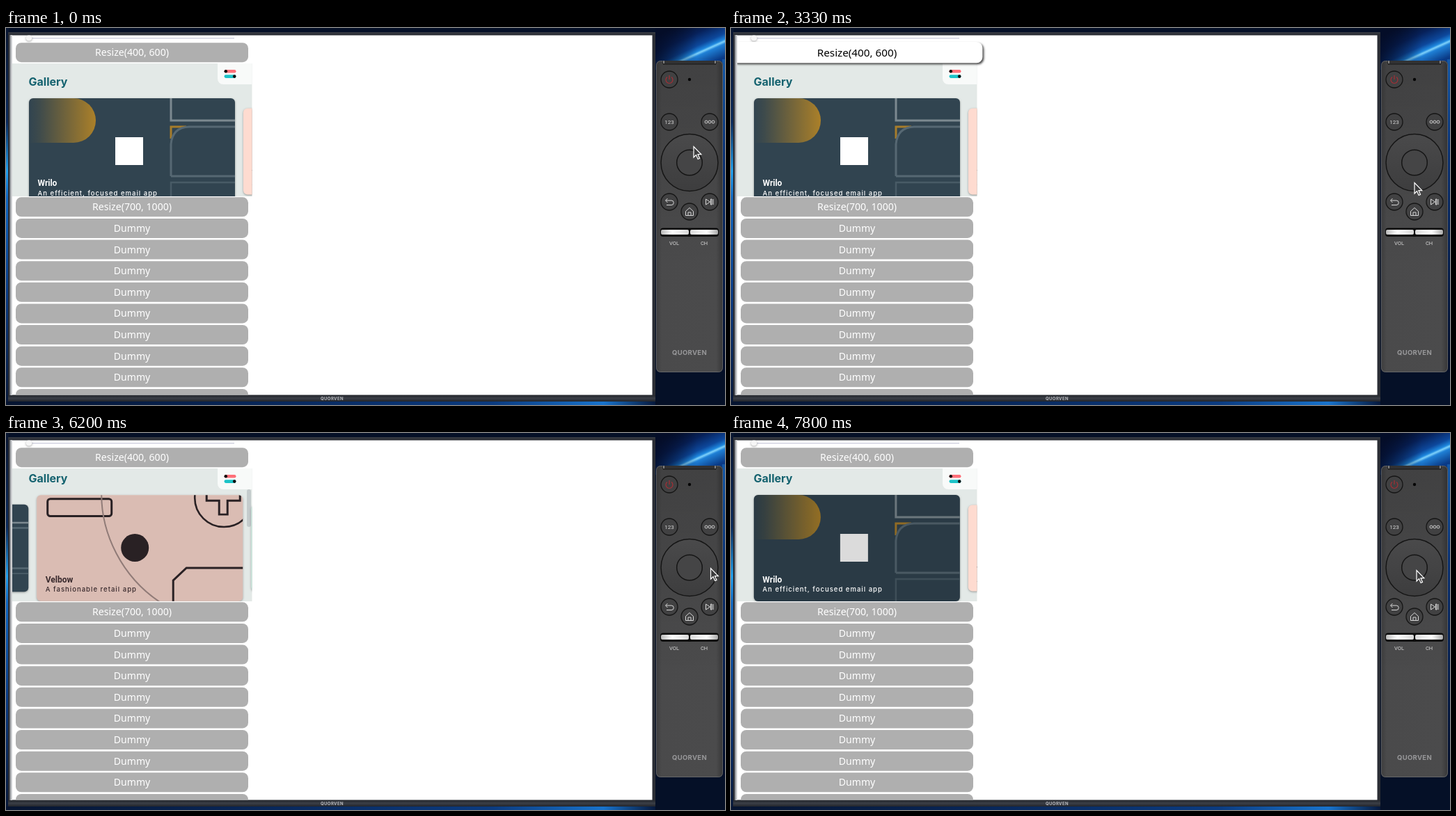
An HTML page with a canvas that plays this animation: 1033 by 542 pixels, repeating every 8 s.

```html
<!DOCTYPE html>
<html lang="en">
<head>
<meta charset="utf-8">
<title>TV remote focus demo</title>
<style>
html, body { margin: 0; width: 100%; height: 100%; overflow: hidden; background: #06122c; }
canvas { display: block; }
</style>
</head>
<body>
<canvas id="stage" width="1033" height="542"></canvas>
<script>
const ctx = document.getElementById('stage').getContext('2d');
const LOOP = 8000, TAU = Math.PI * 2;
const BRAND = 'QUORVEN';

const clamp01 = v => Math.min(1, Math.max(0, v));
const ramp = (t, from, to) => clamp01((t - from) / (to - from));
const ease = v => v * v * (3 - 2 * v);
const between = (t, from, to) => t >= from && t < to;

function gradient(x0, y0, x1, y1, stops) {
  const g = ctx.createLinearGradient(x0, y0, x1, y1);
  stops.forEach(([at, color]) => g.addColorStop(at, color));
  return g;
}
function rect(x, y, w, h, fill) {
  ctx.fillStyle = fill;
  ctx.fillRect(x, y, w, h);
}
function round(x, y, w, h, r, fill, stroke, width = 1) {
  ctx.beginPath();
  ctx.roundRect(x, y, w, h, r);
  paint(fill, stroke, width);
}
function circle(x, y, r, fill, stroke, width = 1) {
  ctx.beginPath();
  ctx.arc(x, y, r, 0, TAU);
  paint(fill, stroke, width);
}
function path(d, fill, stroke, width = 1) {
  const p = new Path2D(d);
  if (fill) { ctx.fillStyle = fill; ctx.fill(p); }
  if (stroke) { ctx.strokeStyle = stroke; ctx.lineWidth = width; ctx.stroke(p); }
}
function paint(fill, stroke, width) {
  if (fill) { ctx.fillStyle = fill; ctx.fill(); }
  if (stroke) { ctx.strokeStyle = stroke; ctx.lineWidth = width; ctx.stroke(); }
}
function text(str, x, y, font, color, align = 'left', spacing = 0) {
  ctx.font = font;
  ctx.letterSpacing = spacing + 'px';
  ctx.textAlign = align;
  ctx.fillStyle = color;
  ctx.fillText(str, x, y);
}
function shadow(color, blur = 0, dx = 0, dy = 0) {
  ctx.shadowColor = color;
  ctx.shadowBlur = blur;
  ctx.shadowOffsetX = dx;
  ctx.shadowOffsetY = dy;
}
const noShadow = () => shadow('transparent');
function group(draw) {
  ctx.save();
  draw();
  ctx.restore();
}

const SCREEN = [9, 10.5, 919.5, 517];

function drawDesktop() {
  rect(0, 0, 1033, 542, '#051027');
  rect(0, 0, 4, 542, gradient(0, 0, 0, 542, [[0, '#081530'], [.25, '#0a2a5c'], [.38, '#22a0ee'],
    [.45, '#1169c4'], [.7, '#0a3c86'], [1, '#071737']]));
  rect(0, 537, 933, 5, gradient(0, 0, 933, 0, [[0, '#061430'], [.4, '#08275a'], [.75, '#0b3b80'],
    [.92, '#1873cc'], [1, '#06183c']]));
  // Light beam rising to the right behind the remote
  rect(933, 0, 100, 60, gradient(972, -6, 1000, 56, [[0, '#040d28'], [.3, '#07215a'], [.55, '#0d489c'],
    [.66, '#1d86dd'], [.7, '#7fd2fb'], [.75, '#1f80d6'], [1, '#0a3a86']]));
  rect(933, 0, 60, 60, gradient(933, 0, 993, 0, [[0, 'rgba(4,13,40,.85)'], [1, 'rgba(4,13,40,0)']]));
  rect(1029, 45, 4, 450, gradient(0, 45, 0, 495, [[0, '#1458a6'], [.3, '#0a3274'], [1, '#030d28']]));
}

function drawTv() {
  rect(3, 6, 930, 531, '#2b2e35');
  rect(3.5, 6.5, 929, 1, '#43474f');
  rect(5, 10, 4, 518, gradient(5, 0, 9, 0, [[0, '#5a5d63'], [.6, '#c4c6c9'], [1, '#dcdddf']]));
  rect(3, 528, 930, 9, gradient(0, 528, 0, 537, [[0, '#25282e'], [.5, '#3a3e46'], [1, '#22252b']]));
  text(BRAND, 468.5, 534.5, 'bold 6px Inter, sans-serif', '#b9bbbf', 'center', .4);
  rect(...SCREEN, '#fff');
}

function drawSlider(t) {
  const focused = between(t, 470, 2730);
  const grown = ease(ramp(t, 670, 1130)) * (1 - ease(ramp(t, 2600, 2800)));
  rect(33, 14, 295, 1.4, '#cfd0de');
  shadow('rgba(0,0,0,.35)', 3, 0, 1);
  circle(33, 14.3, 4.3 + 3 * grown, '#f6f6f6');
  noShadow();
  if (focused) path('M21 8L12 15.5L21 24M341 8L350 15.5L341 24', null, '#111', 1.5);
}

function drawButton(label, centerY, focus = 0) {
  group(() => {
    ctx.translate(181, centerY);
    ctx.scale(1 + .08 * focus, 1 + .08 * focus);
    const shade = Math.round(175 + 80 * focus);
    if (focus) shadow(`rgba(0,0,0,${.7 * focus})`, 3, 2, 2);
    round(-167, -14, 334, 28, 8, `rgb(${shade},${shade},${shade})`);
    noShadow();
    const ink = Math.round(255 * (1 - focus));
    text(label, 0, 5, '14.1px "Noto Sans", sans-serif', `rgb(${ink},${ink},${ink})`, 'center');
  });
}

function drawMailArt() {
  path('M0 0H64A32 32 0 0 1 64 64H0Z', gradient(0, 0, 96, 0, [[0, 'rgba(170,128,40,0)'], [.15, 'rgba(170,128,40,.1)'], [1, '#ab8029']]));
  path('M204 0V32H296', null, '#7c8990', 3);
  path('M204 58V41H226', null, '#a77d2b', 3);
  path('M204 112V66Q206 42 230 41H296M204 112H296', null, '#566873', 3);
  path('M204 153V121H296', null, '#485b66', 2.5);
  round(124, 56, 40, 40, 0, '#fff');
}
function drawShopArt() {
  const ink = '#30262a';
  round(15.5, 5.5, 92, 25, 4, null, ink, 3);
  path('M93 -4C92 55 122 118 178 155', null, '#a78f8b', 2);
  circle(269, 4, 42, null, ink, 2.6);
  path('M244 -5V8H262V28H274V8H292V-5H274V-20H262V-5Z', null, ink, 3);
  path('M196 156V123L215 105H300', null, ink, 3);
  circle(141, 76, 20, ink);
}

const cards = [
  { title: 'Wrilo', note: 'An efficient, focused email app', fill: '#314450', ink: '#fff', art: drawMailArt },
  { title: 'Velbow', note: 'A fashionable retail app', fill: '#fedbd0', ink: '#38292c', art: drawShopArt },
  { title: '', note: '', fill: '#d1f2e6', ink: '#222', art() {} },
];
const CARD_W = 296, CARD_H = 153, PITCH = 308;

function drawCard(card, x, top, distance, tint) {
  const h = CARD_H - 29 * Math.min(1, distance) ** 1.3;
  const y = top + (CARD_H - h) / 2;
  shadow('rgba(0,0,0,.35)', 3, 0, 1);
  round(x, y, CARD_W, h, 6, card.fill);
  noShadow();
  group(() => {
    ctx.beginPath();
    ctx.roundRect(x, y, CARD_W, h, 6);
    ctx.clip();
    ctx.translate(x, y);
    group(() => {
      ctx.scale(1, h / CARD_H);
      card.art();
    });
    rect(0, 0, CARD_W, h, `rgba(0,0,0,${.14 * tint})`);
    text(card.title, 12.5, h - 27, 'bold 12px Roboto, sans-serif', card.ink);
    text(card.note, 12.5, h - 13.5, '500 9.5px Inter, sans-serif', card.ink, 'left', 1.02);
  });
}

// Focus makes the list jump just far enough, then it settles on a page.
const ENTER = 5600, NEXT = 6070, BACK = 6930;
function carouselScroll(t) {
  const rest = since => 24.6 * Math.exp(-6 * (t - since) / 1000);
  if (t < NEXT) return 0;
  return t < BACK ? PITCH - rest(NEXT) : rest(BACK);
}

function drawGallery(t) {
  group(() => {
    ctx.beginPath();
    ctx.rect(9, 51, 344.5, 191);
    ctx.clip();
    rect(9, 51, 345, 191, '#e3e9e7');
    const lift = t >= ENTER ? 12 : 0;
    const scroll = carouselScroll(t);
    text('Gallery', 32.5, 82.5 - lift, 'bold 16px Inter, sans-serif', '#14626f');
    const tints = [
      ramp(t, ENTER, ENTER + 130) - ramp(t, NEXT, NEXT + 130) + ramp(t, BACK, BACK + 130),
      ramp(t, NEXT, NEXT + 130) - ramp(t, BACK, BACK + 130),
      0,
    ];
    cards.forEach((card, i) => {
      const offset = i * PITCH - scroll;
      drawCard(card, 33 + offset, 101 - lift, Math.abs(offset) / PITCH, tints[i]);
    });
    const bar = (t >= ENTER ? 1 : 0) * (1 - ramp(t, 6200, 6500));
    round(346, 81, 6, 54, 3, `rgba(130,140,150,${.33 * bar})`);
    round(304, 51, 50, 30, [0, 0, 0, 8], '#f8faf9');
    round(313.5, 60, 17, 4.6, 2.3, '#ff6f78');
    round(313.5, 67.3, 17, 4.6, 2.3, '#1cc3c8');
    circle(315.8, 62.3, 2.3, '#111');
    circle(328.2, 69.6, 2.3, '#111');
  });
}

function drawScreen(t) {
  group(() => {
    ctx.beginPath();
    ctx.rect(...SCREEN);
    ctx.clip();
    drawSlider(t);
    drawGallery(t);
    for (let i = 0; i < 10; i++) drawButton(i ? 'Dummy' : 'Resize(700, 1000)', 257.3 + 30.62 * i);
    drawButton('Resize(400, 600)', 35.2, ease(ramp(t, 2730, 3300)) * (1 - ease(ramp(t, 4130, 4600))));
  });
}

function drawRemote() {
  const line = '#151515', icon = '#d8d8d8';
  round(934, 47, 96, 448, 6, gradient(934, 0, 1030, 0, [[0, '#3c3c3d'], [.08, '#4a4a4b'], [.9, '#4b4b4c'], [1, '#363637']]));
  round(934, 47, 96, 448, 6, gradient(0, 47, 0, 350, [[0, 'rgba(0,0,0,.13)'], [1, 'rgba(0,0,0,0)']]));
  round(934.5, 47.5, 95, 447, 6, null, '#77797c', .6);
  path('M944 47V52H1020V47', '#323233', '#161616', 1);
  path('M945 47V51M1019 47V51', null, '#d5d5d5', 1);
  [[953, 74], [953, 135], [1011, 135], [953, 250], [1011, 250], [982, 264]]
    .forEach(([x, y]) => circle(x, y, 12, '#414142', line, 1.3));
  path('M950 70.5A5 5 0 1 0 956 70.5M953 68V74', null, '#a82e35', 1.2);
  circle(982, 74, 2.2, '#050505');
  text('123', 953, 138, '8px Roboto, sans-serif', icon, 'center');
  [-5, 0, 5].forEach(dx => circle(1011 + dx, 135, 2, null, icon, .9));
  circle(982, 193.5, 41, gradient(0, 152, 0, 235, [[0, '#4a4a4b'], [1, '#3d3d3e']]), line, 1.5);
  circle(982, 193.5, 18.3, '#454546', line, 1.5);
  path('M950.5 245L947.5 248L950.5 251M948 248H956A3 3 0 0 1 956 254.5H949', null, icon, 1);
  path('M1005.5 246V254L1011.5 250ZM1012.5 246V254H1014V246ZM1016 246V254', null, icon, 1);
  path('M976.5 263.5L982 258.5L987.5 263.5V269.5H976.5ZM980 269V265H984V269', null, icon, 1);
  round(940, 287.5, 84, 12.5, 4, '#0c0c0c');
  const metal = gradient(941, 0, 1023, 0, [[0, '#bbb'], [.2, '#fff'], [.48, '#d9d9d9'], [.53, '#ddd'], [.8, '#fff'], [1, '#aaa']]);
  round(941, 290, 40, 7, 2, metal);
  round(983, 290, 40, 7, 2, metal);
  text('VOL', 960, 312, '7.5px Roboto, sans-serif', icon, 'center');
  text('CH', 1003, 312, '7.5px Roboto, sans-serif', icon, 'center');
  text(BRAND, 982, 469.5, 'bold 9.5px Inter, sans-serif', '#98989a', 'center', .3);
}

// [start, end, x, y] of each key press
const presses = [
  [400, 470, 982, 163], [1400, 1600, 982, 163], [2600, 2730, 982, 223], [4070, 4270, 982, 223],
  [5600, 5730, 1012, 193], [6000, 6130, 1012, 193], [6870, 7000, 951.5, 193], [7670, 7800, 982, 193],
];
// [start, end, x, y] of each pointer move
const moves = [
  [2000, 2500, 981.5, 222], [5070, 5530, 1012, 194], [6270, 6670, 957, 198.5], [7130, 7470, 984.5, 197],
];

function drawPointer(t) {
  presses.forEach(([from, to, x, y]) => { if (between(t, from, to)) circle(x, y, 6.8, '#1a90ea'); });
  let x = 987.5, y = 170;
  for (const [from, to, toX, toY] of moves) {
    const k = ease(ramp(t, from, to));
    x += (toX - x) * k;
    y += (toY - y) * k;
  }
  group(() => {
    ctx.translate(x, y);
    path('M.5 .5V16L4 12.6L6.6 18.5L9 17.4L6.5 11.6H11.3Z', '#3d3d3e', '#fff', 1.2);
  });
}

function frame(now) {
  const t = now % LOOP;
  drawDesktop();
  drawTv();
  drawScreen(t);
  drawRemote();
  drawPointer(t);
  requestAnimationFrame(frame);
}
requestAnimationFrame(frame);
</script>
</body>
</html>
```
